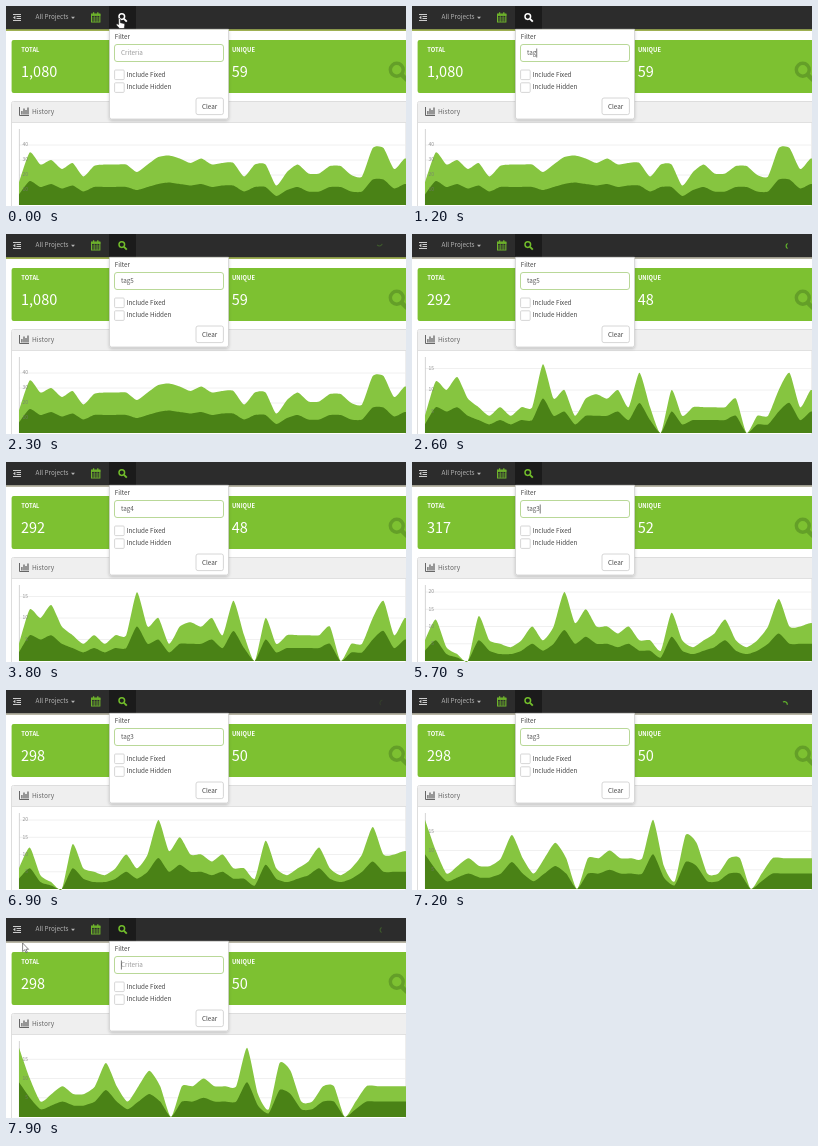
Animation of 400x200 px, one loop 8 s. Source, as an HTML page:

```html
<!DOCTYPE html>
<html lang="en">
<head>
<meta charset="utf-8">
<title>Filter dashboard</title>
<style>
  html, body { margin: 0; width: 100%; height: 100%; overflow: hidden; background: #fff; }
  svg { display: block; width: 100vw; height: 100vh; }
  text { font-family: "Noto Sans CJK SC", "Noto Sans CJK JP", "Noto Sans CJK", "Noto Sans", sans-serif; font-size: 6.3px; fill: #444; white-space: pre; }
  .head { font-size: 5.8px; font-weight: 700; fill: #fff; }
  .num { font-size: 14.5px; fill: #fff; }
  .axis { font-size: 5px; fill: #777; opacity: .8; }
</style>
</head>
<body>
<svg viewBox="0 0 400 200" preserveAspectRatio="none">
  <defs>
    <filter id="soft" x="-10%" y="-10%" width="120%" height="125%">
      <feDropShadow dx="0" dy="1.5" stdDeviation="1.5" flood-opacity=".2"/>
    </filter>
    <g id="lens" fill="none" stroke="currentColor">
      <circle cx="3.6" cy="3.6" r="2.8" stroke-width="1.5"/>
      <path d="M5.8 5.8L8.6 8.6" stroke-width="1.9"/>
    </g>
  </defs>

  <rect width="400" height="200" fill="#fff"/>

  <!-- counters -->
  <rect x="5.6" y="34" width="400" height="53" rx="2" fill="#7dc131"/>
  <text class="head" x="15.3" y="45.5">TOTAL</text>
  <text class="head" x="226" y="45.5">UNIQUE</text>
  <text class="num" id="total" x="15" y="71"></text>
  <text class="num" id="unique" x="225.7" y="71"></text>
  <g color="#649f28"><use href="#lens" transform="translate(382.5 55.5) scale(2.3)"/></g>

  <!-- history panel -->
  <path d="M5.5 200V97.5q0-2 2-2H400V200" fill="#fff" stroke="#ddd"/>
  <path d="M6 116V98q0-2 2-2H400V116Z" fill="#efefef"/>
  <path d="M6 116.5H400" stroke="#e0e0e0"/>
  <path d="M13.5 101V109.5H23" fill="none" stroke="#666"/>
  <path d="M15.9 108.5V105M18 108.5V102.5M20 108.5V104M22 108.5V101.5" stroke="#666" stroke-width="1.3"/>
  <text x="26" y="108.3" style="font-size:6.6px;fill:#666">History</text>

  <!-- chart -->
  <g id="grid" stroke="#ececec" stroke-width=".8"></g>
  <path d="M13.4 123V199" stroke="#ccc" stroke-width=".8"/>
  <path id="hits" fill="#86c540"/>
  <path id="users" fill="#4a8216"/>
  <g id="labels"></g>

  <!-- navigation bar -->
  <rect id="edge" y="22.5" width="400" height="2.5"/>
  <rect width="400" height="23.2" fill="#2c2c2c"/>
  <rect x="103" width="27" height="23.2" fill="#1b1b1b"/>
  <path d="M7 8.5H15M10.5 10.5H15M10.5 12.5H15M7 14.5H15" stroke="#ccc" stroke-width="1.1"/>
  <path d="M9.4 9.6V13.4L7 11.5Z" fill="#ccc"/>
  <text x="29.5" y="13.4" style="fill:#b5b5b5;font-size:6.4px">All Projects</text>
  <path d="M65 10.7H69L67 12.9Z" fill="#b5b5b5"/>
  <g fill="none" stroke="#6fb52c">
    <rect x="85.5" y="8" width="8.4" height="8"/>
    <path d="M85 9H94.4" stroke-width="1.8"/>
    <path d="M87.6 6.3V8.5M91.8 6.3V8.5" stroke-width="1.3"/>
    <path d="M85.5 12H94M85.5 14H94M88.3 10V16M91.1 10V16" stroke-width=".6"/>
  </g>
  <g id="find"><use href="#lens" transform="translate(112.2 7)"/></g>
  <path id="spin" d="M375.6 9.4A3 3 0 0 0 375.6 14.6" fill="none" stroke="#62b62c" stroke-width="1.2"/>

  <!-- filter menu -->
  <path d="M103.5 23.3H222.5V111q0 2-2 2H105.5q-2 0-2-2Z" fill="#fff" stroke="#ccc" stroke-width=".7" filter="url(#soft)"/>
  <text x="108.8" y="33.3">Filter</text>
  <rect x="108.5" y="38.5" width="109" height="17" rx="2.5" fill="#fff" stroke="#b2d48d" stroke-width=".9"/>
  <text id="hint" x="115" y="49.4" style="fill:#999">Criteria</text>
  <text id="word" x="115" y="49.4" style="fill:#555"></text>
  <path id="caret" d="M.4 42.5V51.5" stroke="#444" stroke-width=".7"/>
  <g fill="#fff" stroke="#ccc" stroke-width=".8">
    <rect x="108.6" y="64" width="9.6" height="9.6" rx="1"/>
    <rect x="108.6" y="76.8" width="9.6" height="9.6" rx="1"/>
    <rect x="190" y="92" width="27.4" height="16.6" rx="2"/>
  </g>
  <text x="120.6" y="70.6">Include Fixed</text>
  <text x="120.6" y="83.3">Include Hidden</text>
  <text x="196" y="102.5">Clear</text>

  <!-- pointers -->
  <path id="hand" d="M2.6 6V1q0-1 .9-1t.9 1V4.2L8 5Q9 5.3 8.8 6.5L8.2 10H3.6L.4 6.6Q0 5.6 1 5.3Z" fill="#fff" stroke="#222" stroke-width=".6"/>
  <path id="arrow" d="M0 0V8.6L2 6.8L3.4 9.8L4.7 9.2L3.3 6.3H6Z" transform="translate(16.6 25)" fill="#fff" stroke="#555" stroke-width=".7"/>
</svg>
<script>
const LOOP = 8000, BASE = 199, LEFT = 13;
const $ = id => document.getElementById(id);

const charts = [
  { unit: 1.5, step: 10.72, ratio: .45, ticks: [40, 30, 20, 10],
    v: [15,35,27,30,24,28,19,26,27,27,27,22,27,32,33,31,28,31,27,28,28,19,27,27,13,22,27,21,21,26,26,20,19,38,38,24,31,28] },
  { unit: 4.3, step: 10.72, ratio: .49, ticks: [15, 10, 5],
    v: [4,12,10,13,8,6,4,6,4,6,6,16,8,10,4,8,9,8,10,6,14,6,0,10,4,6,6,6,6,8,0,4,4,10,14,6,10,8] },
  { unit: 3.45, step: 10.72, ratio: .47, ticks: [20, 15, 10, 5],
    v: [6,12,4,2,0,13,6,5,4,6,10,6,10,20,11,15,10,10,8,10,6,6,3,14,6,4,6,8,12,6,4,6,10,18,10,10,11,10] },
  { unit: 3.85, step: 10.86, ratio: .49, ticks: [15, 10, 5],
    v: [18,10,4,6,8,6,6,8,14,8,4,8,12,8,0,8,8,10,8,8,8,18,6,2,14,12,4,4,8,8,0,4,8,8,8,8,8] }
];

// Each track lists [start time, value]; the latest start wins.
const tracks = {
  word: [[0, ''], [900, 't'], [1000, 'ta'], [1200, 'tag'], [1700, 'tag5'], [3500, 'tag'], [3600, 'tag4'],
    [5600, 'tag'], [5700, 'tag3'], [7300, '']],
  caret: [[0, 0], [500, 1], [2100, 0], [3500, 1], [3800, 0], [5600, 1], [5900, 0], [7300, 1]],
  total: [[0, '1,080'], [2400, '292'], [4800, '317'], [6800, '298']],
  unique: [[0, '59'], [2400, '48'], [4800, '52'], [6800, '50']],
  chart: [[0, 0], [2500, 1], [4800, 2], [7200, 3]],
  find: [[0, '#fff'], [2100, '#72bd2b']],
  edge: [[0, '#9fb052'], [2400, '#b9b6a6']],
  arrow: [[0, 0], [7800, 1]]
};
const at = (name, t) => tracks[name].findLast(k => k[0] <= t)[1];

const ramp = (t, a, b) => Math.max(0, Math.min(1, (t - a) / (b - a)));
const pulse = (t, a, b, c, d) => ramp(t, a, b) * (1 - ramp(t, c, d));

// Cardinal spline area: nearly straight runs with rounded corners.
function area(pts) {
  const last = pts.length - 1;
  const bend = (i, k) => {
    const a = pts[Math.max(i - 1, 0)], b = pts[Math.min(i + 1, last)];
    return pts[i].map((p, n) => p + k * (b[n] - a[n]));
  };
  let d = `M${LEFT} ${BASE}L${pts[0]}`;
  for (let i = 1; i <= last; i++) d += `C${bend(i - 1, .1)} ${bend(i, -.1)} ${pts[i]}`;
  return `${d}V${BASE}Z`;
}

for (const c of charts) {
  const y = v => BASE - v * c.unit;
  const shape = f => area(c.v.map((v, i) => [LEFT + i * c.step, y(f(v))]));
  c.hits = shape(v => v);
  c.users = shape(v => Math.round(v * c.ratio));
  c.grid = c.ticks.map(v => `<path d="M13 ${y(v)}H400"/>`).join('');
  c.labels = c.ticks.map(v => `<text class="axis" text-anchor="end" x="22" y="${y(v) + 1.3}">${v}</text>`).join('');
}

let shown = -1;
function showChart(n) {
  if (n === shown) return;
  shown = n;
  const c = charts[n];
  $('hits').setAttribute('d', c.hits);
  $('users').setAttribute('d', c.users);
  $('grid').innerHTML = c.grid;
  $('labels').innerHTML = c.labels;
}

function draw(time) {
  const t = Math.floor(time / 100) * 100;
  const word = at('word', t);
  $('word').textContent = word;
  $('hint').style.opacity = word ? 0 : 1;
  const end = 115 + (word ? $('word').getComputedTextLength() : 0);
  $('caret').setAttribute('transform', `translate(${end} 0)`);
  $('caret').style.opacity = at('caret', t);
  $('total').textContent = at('total', t);
  $('unique').textContent = at('unique', t);
  $('find').style.color = at('find', t);
  $('edge').style.fill = at('edge', t);
  showChart(at('chart', t));

  const glow = pulse(t, 2200, 2500, 2900, 3300) + pulse(t, 4780, 5000, 5100, 5400) + pulse(t, 6860, 7200, 7500, 8100);
  $('spin').style.opacity = glow;
  $('spin').setAttribute('transform', `rotate(${(t - 2600) * 1800 / 5300} 374 12)`);

  const go = ramp(t, 100, 500);
  $('hand').setAttribute('transform', `translate(${110 + 9 * go} ${12.5 + 28 * go})`);
  $('hand').style.opacity = t < 500 ? 1 : 0;
  $('arrow').style.opacity = at('arrow', t);
}

const start = performance.now();
function tick() {
  draw((performance.now() - start) % LOOP);
  requestAnimationFrame(tick);
}
tick();
</script>
</body>
</html>
```
